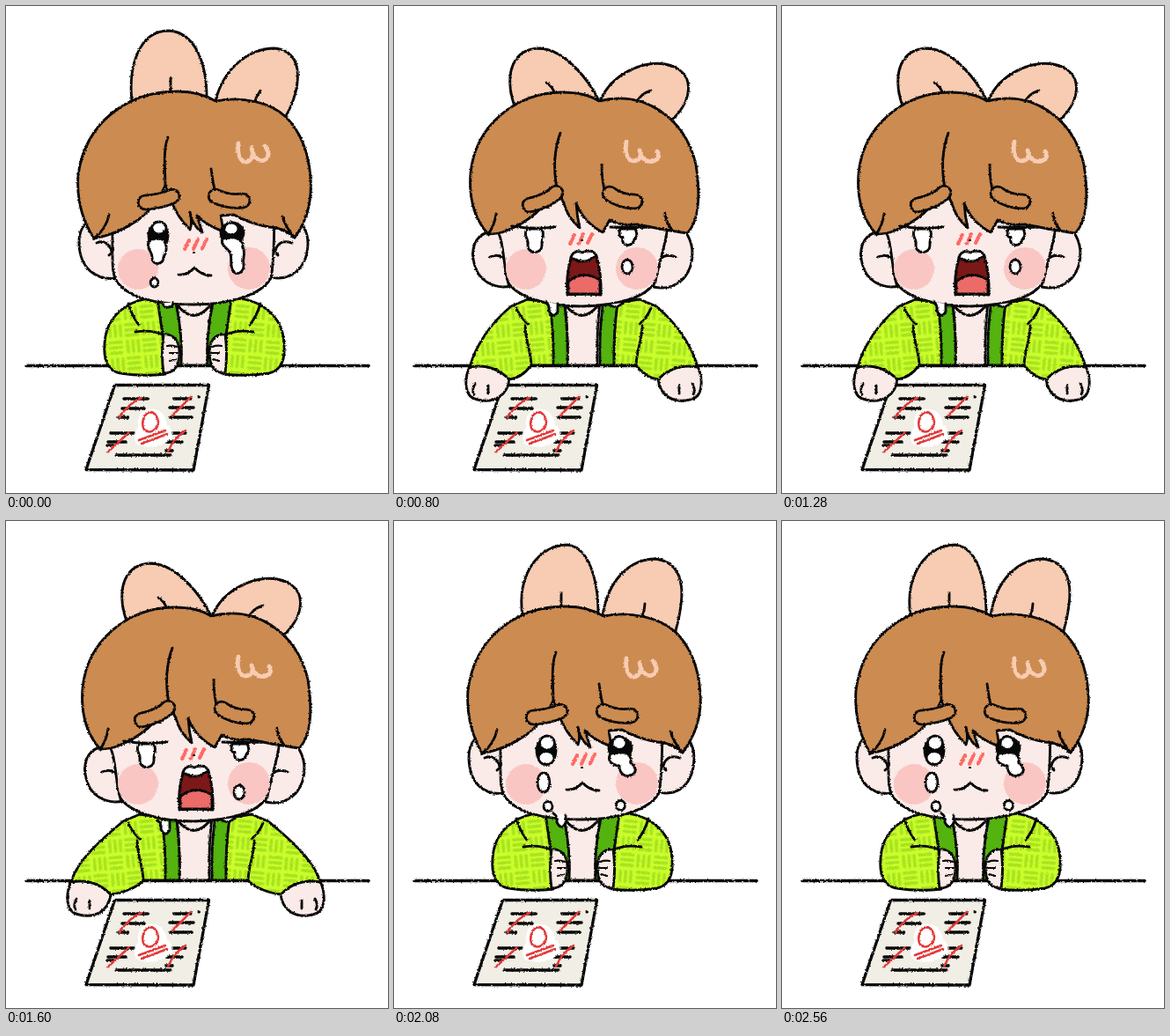
An HTML page that plays this animation: 434x553 px, repeating every 2.72 s.

```html
<!DOCTYPE html>
<html lang="en">
<head>
<meta charset="utf-8">
<title>Crying over a test</title>
<style>
html, body { margin: 0; width: 100%; height: 100%; overflow: hidden; background: #fff; }
svg { display: block; width: 434px; height: 553px; }
path, ellipse { stroke-linecap: round; stroke-linejoin: round; }
</style>
</head>
<body>
<svg id="stage" viewBox="0 0 434 553"></svg>
<script>
const INK = '#080808', SKIN = '#fbebe8', HAIR = '#cc8b51', EAR = '#f7ccb2',
  LIME = '#cbfd2c', LEAF = '#a6e31e', GREEN = '#54b30f', RED = '#e23a3a',
  CHEEK = '#f9c6c3', BLUSH = '#ff6a63';

const path = (d, fill = 'none', stroke = INK, width = 2.9) =>
  `<path d="${d}" fill="${fill}" stroke="${stroke}" stroke-width="${width}"/>`;
const oval = (x, y, rx, ry, fill = '#fff', stroke = INK) =>
  `<ellipse cx="${x}" cy="${y}" rx="${rx}" ry="${ry}" fill="${fill}" stroke="${stroke}" stroke-width="2.8"/>`;
const brow = d => path(d, 'none', INK, 18.6) + path(d, 'none', HAIR, 13);
const mirrored = (half, width) =>
  half + `<g transform="translate(${width}) scale(-1 1)">${half}</g>`;

const defs = `<defs>
  <pattern id="weave" width="38" height="38" patternUnits="userSpaceOnUse" patternTransform="translate(6 7) rotate(-5)">
    <rect width="38" height="38" fill="${LIME}"/>
    ${path('M3 4H16M3 10H16M3 16H16M22 23H35M22 29H35M22 35H35M23 4V16M29 4V16M35 4V16M4 23V35M10 23V35M16 23V35', 'none', LEAF, 3.4)}
  </pattern>
  <filter id="rough" x="0" y="0" width="434" height="553" filterUnits="userSpaceOnUse" color-interpolation-filters="sRGB">
    <feTurbulence type="fractalNoise" baseFrequency=".55" numOctaves="1" seed="4"/>
    <feDisplacementMap in="SourceGraphic" scale="3" xChannelSelector="R" yChannelSelector="G"/>
  </filter></defs>`;

const desk = path('M23 408.5H412', 'none', INK, 3.4) +
  path('M123.500 430.500H230.500L213 527L91 526.500Z', '#f1eee5', INK, 3.3) +
  path('M134 446H161M132 457H157M128 467H139M191 446H210M186 456H213M187 467H211M119 485H145M116 495H136M115 499H122M187 485H204M182 495H200M182 505H189M125 510H187', 'none', INK, 3.5) +
  path('M219 444h.5', 'none', INK, 3) +
  path('M164 460C154 460 151 470 153 479C148 484 147 492 151 496C162 501 178 497 185 490C188 484 185 479 180 477C180 466 174 460 164 460Z', '#fff', '#fff', 5) +
  path('M129 467Q139 451 154 445M189 465Q198 456 211 443M115 507Q126 497 140 484M184 506Q191 490 204 482', 'none', RED, 2.5) +
  path('M164 461C156 463 153 474 157 481C163 487 173 481 173 472C172 465 168 461 164 461ZM151 493L181 482M154 497L183 486', 'none', RED, 2.5);

const chest = path('M194 336Q198 372 197 408H231Q230 372 234 336Z', SKIN) +
  path('M196 341Q213 362 231 341');

const bodies = {
  folded: () => chest + mirrored(
    path('M171 332L193 337Q201 375 199 408H178Z', GREEN) +
    path('M172 332C145 330 118 348 113 375C109 400 114 414 130 417Q155 421 181 418L178 374Z', 'url(#weave)') +
    path('M139 338Q143 352 151 362M147 370Q166 367 180 374') +
    path('M179 373C190 372 197 380 197 393C197 410 190 417 179 417Q176 395 179 373Z', SKIN) +
    path('M183 386Q188 385 194 387M186 394H195M186 403L193 401', 'none', INK, 2.2), 428),

  leaning: () => chest + mirrored(
    path('M175 335L194 339Q199 375 197 408H180Z', GREEN) +
    path('M122 440C120 452 134 455 148 455C163 456 173 442 167 424L140 415Z', SKIN) +
    path('M144 442L148 453M155 438L160 448') +
    path('M150 333L176 336Q181 375 180 408H157Q161 418 167 424Q138 415 124 442C110 433 106 415 107 395C108 365 118 345 138 336Z', 'url(#weave)') +
    path('M138 338Q144 353 151 362M154 374C151 392 153 402 157 409'), 428),

  // spread moves the hands outwards
  flailing: spread => {
    const x = v => v - spread;
    return chest + mirrored(
      path('M175 336L194 340Q198 375 197 408H180Z', GREEN) +
      path(`M${x(86)} 409C${x(79)} 425 ${x(80)} 445 ${x(95)} 447C${x(115)} 452 ${x(129)} 441 ${x(131)} 424Q${x(110)} 402 ${x(86)} 409Z`, SKIN) +
      path(`M${x(92)} 429Q${x(88)} 436 ${x(91)} 441M${x(107)} 431V440`) +
      path(`M152 333L177 337Q182 375 181 408H156C149 417 ${x(141)} 423 ${x(131)} 424Q${x(112)} 405 ${x(86)} 410C${x(93)} 385 110 360 133 341Z`, 'url(#weave)') +
      path('M139 343Q143 353 152 361M149 363C149 378 155 390 156 407'), 431);
  }
};

// dx moves the crown sideways while the fringe stays put
const calmHair = dx => path(
  `M100 264C${87 + dx} 244 ${80 + dx} 220 ${82 + dx} 192C${90 + dx} 132 138 97 195 97Q220 97 238 108` +
  `C268 102 300 109 ${318 + dx} 126C${335 + dx} 143 ${344 + dx} 168 ${346 + dx} 195C${348 + dx} 226 340 246 328 263` +
  'Q314 251 299 251Q276 247 259 237L244 238L247 256Q229 250 217 238L223 257Q211 249 209 234Q212 246 209 254' +
  'Q195 240 188 222L181 204Q170 228 150 243Q127 259 100 264Z', HAIR) +
  path('M117 237Q114 253 100 264M314 239Q318 252 328 263');

const curl = path('M264 156C262 171 268 178 274 177C281 174 281 166 279 161C281 174 290 178 295 174C300 170 298 163 294 159', 'none', EAR, 4.8);
const cheeks = `<g fill="${CHEEK}"><circle cx="150" cy="299" r="23"/><circle cx="276" cy="298" r="24"/></g>`;
const blush = (x, y) => path(`M${x} ${y}l5-10m5 10l5-11m5 10l5-10`, 'none', BLUSH, 4);

const calmHead = dx => ({
  lobes: path(`M115 240C${96 + dx} 236 ${82 + dx} 250 ${83 + dx} 270C${84 + dx} 298 102 312 126 309L127 250ZM315 240C${332 - dx} 236 ${343 - dx} 252 ${343 - dx} 270C${342 - dx} 298 324 313 300 308L299 250Z`, SKIN) +
    path('M103 269Q113 265 118 274Q122 280 117 283M325 269Q313 265 308 273Q304 279 309 283'),
  face: 'M121 190V262C121 290 120 304 126 313C140 333 175 339 213 339C255 339 290 328 301 309C304 292 306 262 304 190Z',
  hair: calmHair(dx) + path('M184 149C178 165 181 185 181 206M233 185Q235 202 239 217') + curl,
  brows: brow('M158 223Q176 222 189 216') + brow('M238 216Q252 223 269 221'),
  blush: blush(203, 276) + path('M213 280h1', 'none', INK, 2.2),
  mouth: path('M196 305Q207 306 214 297Q222 306 233 306')
});

const leanHead = {
  lobes: path('M110 253C89 253 84 270 87 285C90 308 110 320 128 317L129 250ZM322 250C340 256 344 275 341 288C335 310 318 318 300 315L299 250Z', SKIN) +
    path('M106 284Q117 279 124 288M322 284Q310 279 302 288'),
  face: 'M122 190V264C124 290 122 304 128 315C142 333 175 339 213 339C255 339 290 331 301 313C302 292 306 262 306 190Z',
  hair: `<g transform="translate(2 2)">${calmHair(-2)}</g>` + path('M187 149C180 166 182 187 183 207M234 180Q236 200 241 220') + curl,
  brows: brow('M157 231Q172 232 187 224') + brow('M241 224Q254 231 270 230'),
  blush: blush(202, 272) + path('M212 279h1', 'none', INK, 2.2),
  mouth: path('M202 291Q200 305 201 318Q216 320 231 318Q232 300 228 290Z', '#7c1818') +
    path('M201 309Q216 300 231 309V318H201Z', '#ea6b68') +
    path('M200 293Q207 290 214 284Q223 286 232 292Q215 301 200 293Z', '#fff')
};

const wailHead = {
  lobes: path('M107 257C91 261 87 278 91 292C95 312 114 322 133 318L134 245ZM330 255C341 269 340 285 337 295C331 315 312 323 295 319L294 245Z', SKIN) +
    path('M109 285Q120 280 128 290M320 285Q307 280 300 290'),
  face: 'M119 190V258C126 275 124 298 130 315C144 333 178 341 213 341C255 340 286 331 297 313C300 295 309 270 311 250V190Z',
  hair: path('M107 259C90 240 85 215 87 190C92 135 140 98 190 98Q218 98 233 108C282 95 330 125 343 180C349 220 346 245 333 258Q305 254 276 248Q258 250 245 243L237 257Q215 245 207 224Q208 239 211 252Q197 240 193 224L184 206Q166 240 128 255Q119 259 107 259Z', HAIR) +
    path('M116 236Q114 250 107 259M308 235Q309 246 315 253M189 144C182 163 181 185 185 207M236 180Q236 202 242 220') +
    path('M264 154C261 170 268 177 274 176C281 174 281 168 279 164C281 175 289 179 297 175C302 172 301 168 299 165', 'none', EAR, 4.8),
  brows: brow('M154 226Q174 222 184 212') + brow('M245 213Q257 222 274 222'),
  blush: blush(200, 270) + path('M213 266h1', 'none', INK, 2.2),
  mouth: path('M201 286Q195 308 197 328Q216 326 235 328Q236 304 230 284Z', '#7c1818') +
    path('M198 313Q214 299 234 311V327H198Z', '#ea6b68') +
    path('M201 285Q205 276 214 280Q224 275 230 283Q215 296 201 285Z', '#fff')
};

const bunnyEars = (left, right, creases) => path(left, EAR) + path(right, EAR) + path(creases);
const perkedEars = bunnyEars('M146 108C139 60 165 27 197 27C221 30 232 65 232 106Z',
  'M237 108C243 65 270 43 297 43C337 48 328 95 320 125L300 130Z', 'M190 82V96M285 94Q285 101 282 108');
const ears = {
  relaxed: bunnyEars('M143 108C139 70 150 28 185 28C215 30 228 65 228 104Z',
    'M238 108C247 70 277 48 305 48C343 52 333 98 318 125L300 130Z', 'M187 82V97M289 96Q284 103 282 111'),
  perked: perkedEars,
  raised: `<g transform="translate(0 -2)">${perkedEars}</g>`,
  tilted: bunnyEars('M148 110C130 75 128 37 172 35C206 37 222 75 230 108Z',
    'M234 108C250 72 280 57 308 58C347 65 338 102 319 127L300 132Z', 'M180 84Q186 92 187 101M290 94Q281 99 280 109'),
  drooped: bunnyEars('M137 114C124 75 136 48 166 48C195 50 222 85 233 108Z',
    'M234 108C248 75 285 62 308 66C344 73 340 107 316 129L300 132Z', 'M173 87Q181 92 183 101M292 96Q279 100 276 110')
};

const pupils = oval(173, 261, 11, 14, INK) + oval(257, 258, 13, 12, INK);
const drip = (x, y) => path(`M${x - 9} ${y - 12}Q${x - 4} ${y - 9} ${x - 5} ${y - 2}Q${x} ${y + 8} ${x + 5} ${y - 1}V${y - 10}`, '#fff');
const stream = (x, y) => path(`M${x - 7} ${y}C${x - 14} ${y + 9} ${x - 5} ${y + 13} ${x - 5} ${y + 20}C${x - 6} ${y + 30} ${x + 8} ${y + 30} ${x + 8} ${y + 20}C${x + 13} ${y + 12} ${x + 12} ${y + 3} ${x + 5} ${y - 1}Z`, '#fff');
const wailTears = fall =>
  path('M134 250Q158 254 183 251M246 251Q266 252 291 251') +
  path('M151 253C146 262 154 264 152 272C152 282 168 282 168 272C167 264 172 261 168 253Z', '#fff') +
  path('M257 253Q254 262 260 263C257 274 272 274 273 265Q278 261 274 253Z', '#fff') +
  oval(265, 296 + fall, 6, 8) + drip(181, 348 + fall / 3) +
  path('M244 339Q253 345 260 337', '#fff');

const tears = {
  weep: pupils + stream(171, 265) + oval(174, 252, 8, 7) +
    path('M246 264C243 273 253 275 255 281C257 287 254 294 258 301C262 307 271 302 270 293C268 287 273 281 269 274C270 266 262 262 256 263Z', '#fff') +
    oval(256, 253, 8, 7) + oval(168.5, 314, 4.3, 5) + path('M178 337Q179 343 185 342Q190 342 190 337', '#fff'),
  drops: pupils + oval(174, 252, 8.5, 8) + oval(173, 269, 9, 7.5) + oval(170, 297, 7, 11) + oval(175, 324, 5, 5.5) + drip(190, 344) +
    path('M246 264C241 274 249 277 256 278C256 287 263 291 268 289C278 286 274 278 269 275C270 266 265 262 258 263Z', '#fff') +
    oval(256, 252, 8, 7.5) + oval(257.500, 323, 5, 5.5),
  swell: pupils + oval(174, 252, 8, 7.5) + stream(172, 268) + oval(169, 310, 5, 7) + drip(187, 346) +
    oval(258, 268, 10, 9) + oval(256, 252, 8, 7.5) + oval(264, 296, 6, 9),
  sob: path('M150 263Q168 265 183 265M246 264Q262 266 277 265') + path('M159 266Q158 276 168 279Q174 279 175 274Q182 273 182 266Z', '#fff') +
    path('M255 266Q253 277 263 279Q273 279 271 266Z', '#fff') + oval(165, 302, 7, 8.5) + oval(262.500, 309, 6, 9) +
    path('M174 336Q179 342 188 338', '#fff'),
  wail0: wailTears(0), wail1: wailTears(6), wail2: wailTears(12)
};

const pose = (earName, head, body, tearName) =>
  body + ears[earName] + head.lobes + path(head.face, SKIN) + cheeks +
  head.blush + head.mouth + head.hair + head.brows + tears[tearName];

const poses = {
  weep: pose('relaxed', calmHead(0), bodies.folded(), 'weep'),
  perk: pose('perked', calmHead(2), bodies.folded(), 'drops'),
  rise: pose('raised', calmHead(2), bodies.folded(), 'swell'),
  sob: pose('tilted', leanHead, bodies.leaning(), 'sob'),
  wail: pose('drooped', wailHead, bodies.flailing(0), 'wail0'),
  wide: pose('drooped', wailHead, bodies.flailing(7), 'wail1'),
  widest: pose('drooped', wailHead, bodies.flailing(12), 'wail2')
};

const STEP = 160;
const sequence = ('weep perk rise weep sob wail wide widest wail wide widest ' +
  'sob weep perk rise weep perk').split(' ');

const stage = document.getElementById('stage');
stage.innerHTML = defs + `<g filter="url(#rough)">${desk}` +
  Object.entries(poses).map(([name, art]) => `<g id="${name}" display="none">${art}</g>`).join('') + '</g>';

let current;
function show(name) {
  if (name === current) return;
  if (current) document.getElementById(current).setAttribute('display', 'none');
  document.getElementById(name).removeAttribute('display');
  current = name;
}

const start = performance.now();
function tick() {
  const elapsed = performance.now() - start;
  show(sequence[Math.floor(elapsed / STEP) % sequence.length]);
  requestAnimationFrame(tick);
}
tick();
</script>
</body>
</html>
```
